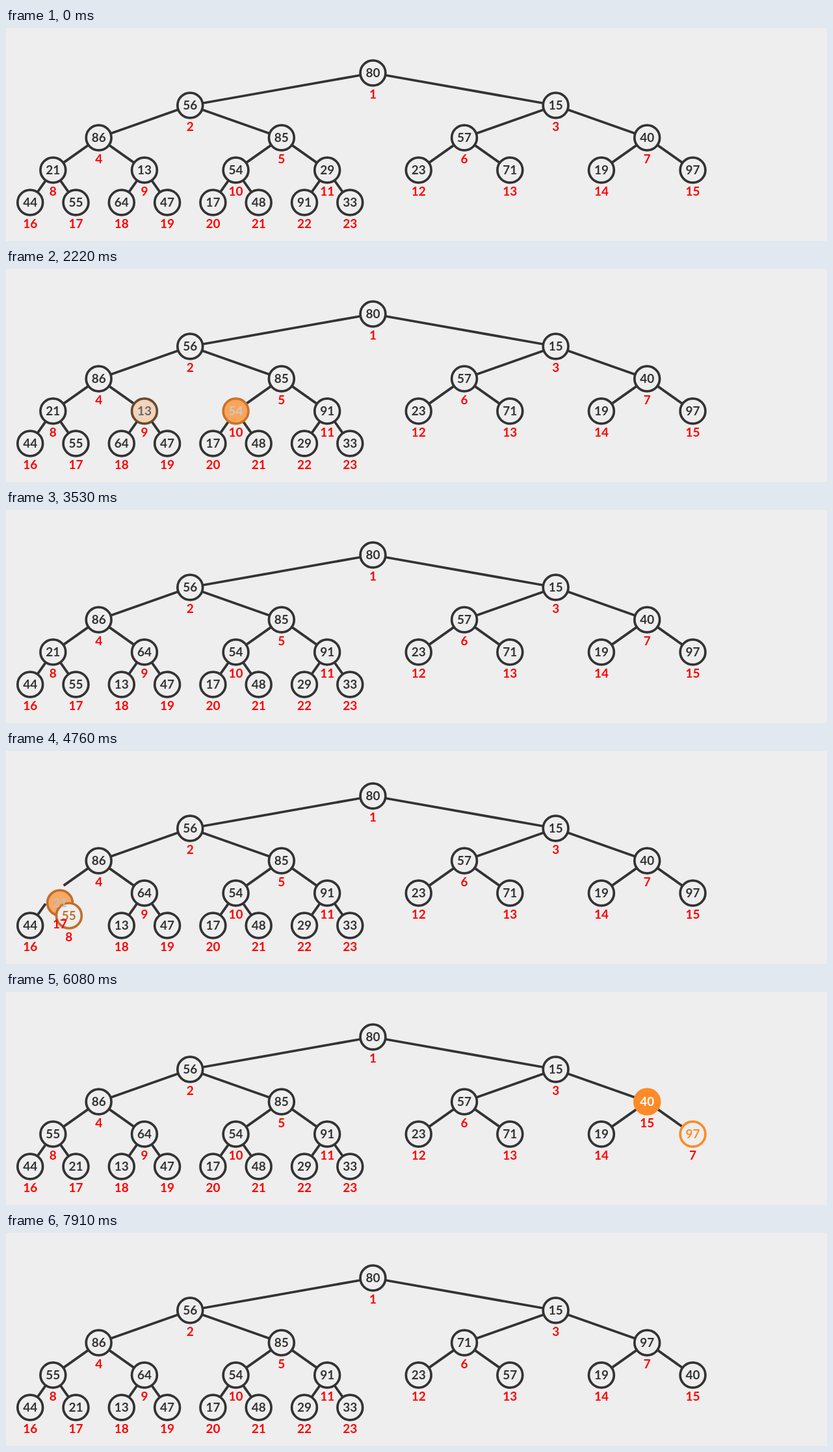
Recreate the animation shown at these times as an HTML page. Size 1263 px wide and 329 px high, loop 8000 ms.

```html
<!DOCTYPE html>
<html lang="en">
<head>
<meta charset="utf-8">
<title>Building a max heap</title>
<style>
  html, body { margin: 0; width: 100%; height: 100%; overflow: hidden; background: #eee; }
  svg { display: block; width: 100%; height: 100%; }
  line { stroke: #333; stroke-width: 3.8; }
  circle { stroke-width: 3.7; }
  text { font: 700 19px Lato, sans-serif; text-anchor: middle; }
  .index { fill: #f00; }
</style>
</head>
<body>
<svg viewBox="0 0 1263 329"></svg>
<script>
const LOOP = 8000, FADE = 350, LABEL_LEAD = 30, RADIUS = 19.4;
const DARK = [51, 51, 51], PAPER = [238, 238, 238], ORANGE = [255, 138, 39], WHITE = [255, 255, 255];
const values = [80, 56, 15, 86, 85, 57, 40, 21, 13, 54, 29, 23, 71, 19, 97,
                44, 55, 64, 47, 17, 48, 91, 33];

// Heap slots are numbered from 1, as in the labels.
const place = slot => {
  const level = Math.floor(Math.log2(slot));
  const span = 2 ** (4 - level);
  const column = (slot - 2 ** level) * span + (span - 1) / 2;
  return [37.2 + 70.3 * column, 69.5 + 50 * level];
};

// Each sift: compare a parent with its larger child, swap if needed.
const starts = [80, 560, 1078, 1590, 2080, 2575, 3080, 3580, 4110, 4613,
                5115, 5640, 6085, 6620, 7090, 7570];
const sifts = [[11, 22], [10], [9, 18], [8, 17], [7, 15], [6, 13]];
const steps = [{ at: -FADE, slots: [0, ...values.map((_, i) => i + 1)] }];
const addStep = (parent, child, slots) =>
  steps.push({ at: starts[steps.length - 1], parent, child, slots });
for (const [parent, child] of sifts) {
  const slots = steps.at(-1).slots;
  addStep(parent, 0, slots);
  if (!child) continue;
  addStep(parent, child, slots);
  const swapped = [...slots];
  swapped[parent] = child;
  swapped[child] = parent;
  addStep(0, 0, swapped);
}

const svg = document.querySelector('svg');
const set = (el, attrs) => {
  for (const key in attrs) el.setAttribute(key, attrs[key]);
};
const make = (tag, parent, attrs = {}) => {
  const el = document.createElementNS('http://www.w3.org/2000/svg', tag);
  set(el, attrs);
  return parent.appendChild(el);
};
const [edgeLayer, circleLayer, valueLayer, indexLayer] = [0, 0, 0, 0].map(() => make('g', svg));

for (let slot = 2; slot <= values.length; slot++) {
  const [x1, y1] = place(slot >> 1), [x2, y2] = place(slot);
  const k = 20 / Math.hypot(x2 - x1, y2 - y1);
  const dx = (x2 - x1) * k, dy = (y2 - y1) * k;
  make('line', edgeLayer, { x1: x1 + dx, y1: y1 + dy, x2: x2 - dx, y2: y2 - dy });
}

const nodes = values.map((value, i) => {
  const circle = make('circle', circleLayer, { r: RADIUS });
  const number = make('text', valueLayer);
  const index = make('text', indexLayer, { class: 'index' });
  number.textContent = value;
  return { id: i + 1, circle, number, index };
});

const lerp = (a, b, p) => a + (b - a) * p;
const mix = (a, b, p) => a.map((v, i) => lerp(v, b[i], p));
const rgb = c => `rgb(${c.map(Math.round)})`;
const ease = p => p < 0.5 ? 4 * p ** 3 : 1 - 4 * (1 - p) ** 3;
const stepAt = t => steps.findLastIndex(s => s.at <= t);

const look = (step, id) => {
  if (id === step.parent) return [ORANGE, ORANGE, WHITE];
  if (id === step.child) return [PAPER, ORANGE, ORANGE];
  return [PAPER, DARK, DARK];
};

function draw(t) {
  const k = stepAt(t);
  const now = steps[k], before = steps[Math.max(0, k - 1)];
  const p = ease(Math.min(1, (t - now.at) / FADE));
  const labels = steps[stepAt(t + LABEL_LEAD)].slots;
  for (const { id, circle, number, index } of nodes) {
    const [x, y] = mix(place(before.slots[id]), place(now.slots[id]), p);
    const to = look(now, id);
    const [fill, stroke, ink] = look(before, id).map((c, i) => rgb(mix(c, to[i], p)));
    set(circle, { cx: x, cy: y, fill, stroke });
    set(number, { x, y: y + 6.5, fill: ink });
    set(index, { x, y: y + 39.5 });
    index.textContent = labels[id];
  }
}

const origin = performance.now();
function tick() {
  draw((performance.now() - origin) % LOOP);
  requestAnimationFrame(tick);
}
draw(0);
requestAnimationFrame(tick);
</script>
</body>
</html>
```
